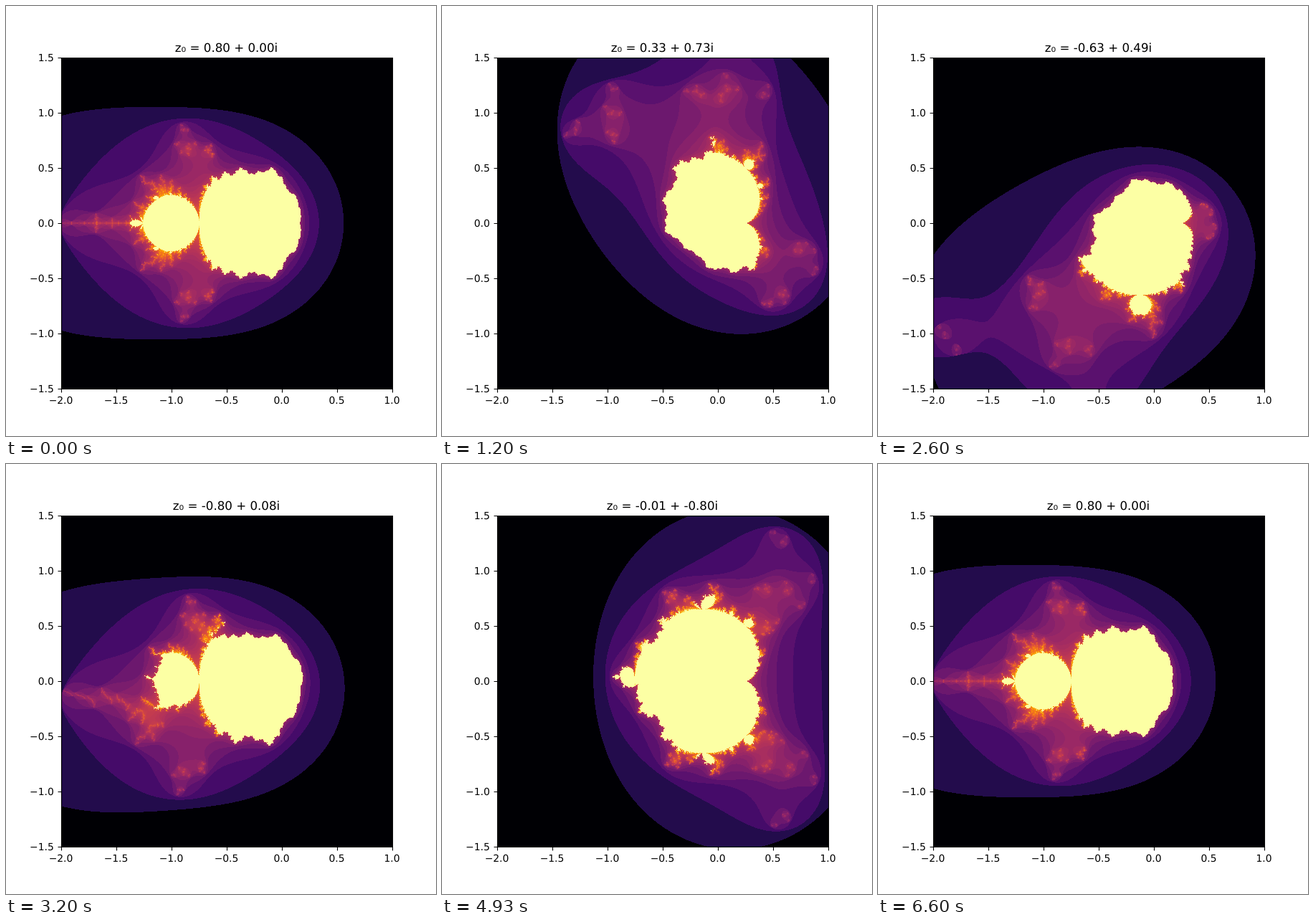
Recreate the animation shown at these times as an HTML page with a canvas. Size 600 by 600 pixels, loop 6670 ms.

```html
<!DOCTYPE html>
<html lang="en">
<head>
<meta charset="utf-8">
<title>Mandelbrot set with a rotating start value</title>
<style>
  html, body { margin: 0; width: 100%; height: 100%; overflow: hidden; background: #fff; }
  canvas { position: absolute; left: 77px; top: 72px; }
  svg { position: absolute; left: 0; top: 0; }
  text { font-family: "DejaVu Sans", sans-serif; font-size: 13.889px; text-rendering: geometricPrecision; }
  #title { font-size: 16.667px; }
  path { fill: none; stroke: #000; stroke-width: 1.11; }
</style>
</head>
<body>
<canvas id="plot" width="462" height="462"></canvas>
<svg width="600" height="600" viewBox="0 0 600 600">
  <path id="axes"/>
  <text id="title" x="307.5" y="64" text-anchor="middle"></text>
  <g id="labels"></g>
</svg>
<script>
const SIZE = 462, UNIT = 154, MAX_ITER = 200, FRAMES = 100, LOOP = 6670, RADIUS = 0.8;

// Inferno colour stops, eight palette steps apart
const STOPS = ("000004 040312 0b0724 150b37 210c4a 2f0a5b 3d0965 4a0c6b 57106e 64156e 71196e " +
  "7d1e6d 8a226a 972766 a32c61 b0315b bc3754 c73e4c d24644 db503b e45a31 eb6628 f1731d f68013 " +
  "f98e09 fb9d07 fcac11 fbbc21 f9cb35 f5db4c f2ea69 f3f68a fdffa8").split(" ");
const INSIDE = rgba([252, 255, 164]);

function rgba([r, g, b]) {
  return (255 << 24 | b << 16 | g << 8 | r) >>> 0;
}

function channels(hex) {
  return [0, 2, 4].map(i => parseInt(hex.substr(i, 2), 16));
}

function inferno(index) {
  const i = index >> 3, part = (index & 7) / 8;
  const from = channels(STOPS[i]), to = channels(STOPS[i + 1]);
  return rgba(from.map((v, c) => Math.round(v + (to[c] - v) * part)));
}

// Colour by logarithm of the escape count
const colours = Array.from({ length: MAX_ITER }, (_, n) =>
  inferno(Math.floor(256 * Math.log(Math.max(1, n)) / Math.log(MAX_ITER))));
colours.push(INSIDE);
const palette = Uint32Array.from(colours);

const ctx = document.getElementById("plot").getContext("2d");
const image = ctx.createImageData(SIZE, SIZE);
const pixels = new Uint32Array(image.data.buffer);
const title = document.getElementById("title");

function escapeCount(zr, zi, cr, ci) {
  let rr = zr * zr, ii = zi * zi;
  for (let n = 0; n < MAX_ITER; n++) {
    zi = 2 * zr * zi + ci;
    zr = rr - ii + cr;
    rr = zr * zr;
    ii = zi * zi;
    if (rr + ii > 4) return n;
  }
  return MAX_ITER;
}

function drawSet(zr, zi) {
  let p = 0;
  for (let row = 0; row < SIZE; row++) {
    const ci = -1.5 + (row + 0.5) / UNIT; // imaginary part grows downwards
    for (let col = 0; col < SIZE; col++) {
      pixels[p++] = palette[escapeCount(zr, zi, -2 + (col + 0.5) / UNIT, ci)];
    }
  }
  ctx.putImageData(image, 0, 0);
}

function drawAxes() {
  let d = "M77.5 72V535M539.5 72V535M77 72.5H540M77 534.5H540";
  let labels = "";
  const number = v => v.toFixed(1).replace("-", "\u2212");
  for (let i = 0; i < 7; i++) {
    const at = 77 * i;
    d += `M${77.5 + at} 534.5v5M77.5 ${72.5 + at}h-5`;
    labels += `<text x="${76.5 + at}" y="555" text-anchor="middle">${number(-2 + i / 2)}</text>` +
      `<text x="66.8" y="${77 + at}" text-anchor="end">${number(1.5 - i / 2)}</text>`;
  }
  document.getElementById("axes").setAttribute("d", d);
  document.getElementById("labels").innerHTML = labels;
}

let shown = -1;

function render(time) {
  // Fifteen steps a second, timed in whole hundredths
  const step = Math.floor((Math.floor((time % LOOP) / 10) + 0.5) * 0.15);
  if (step === shown) return;
  shown = step;
  const angle = 2 * Math.PI * step / (FRAMES - 1);
  const zr = RADIUS * Math.cos(angle), zi = RADIUS * Math.sin(angle);
  title.textContent = `z\u2080 = ${zr.toFixed(2)} + ${zi.toFixed(2)}i`;
  drawSet(zr, zi);
}

function tick() {
  render(performance.now() - start);
  requestAnimationFrame(tick);
}

drawAxes();
const start = performance.now();
tick();
</script>
</body>
</html>
```
